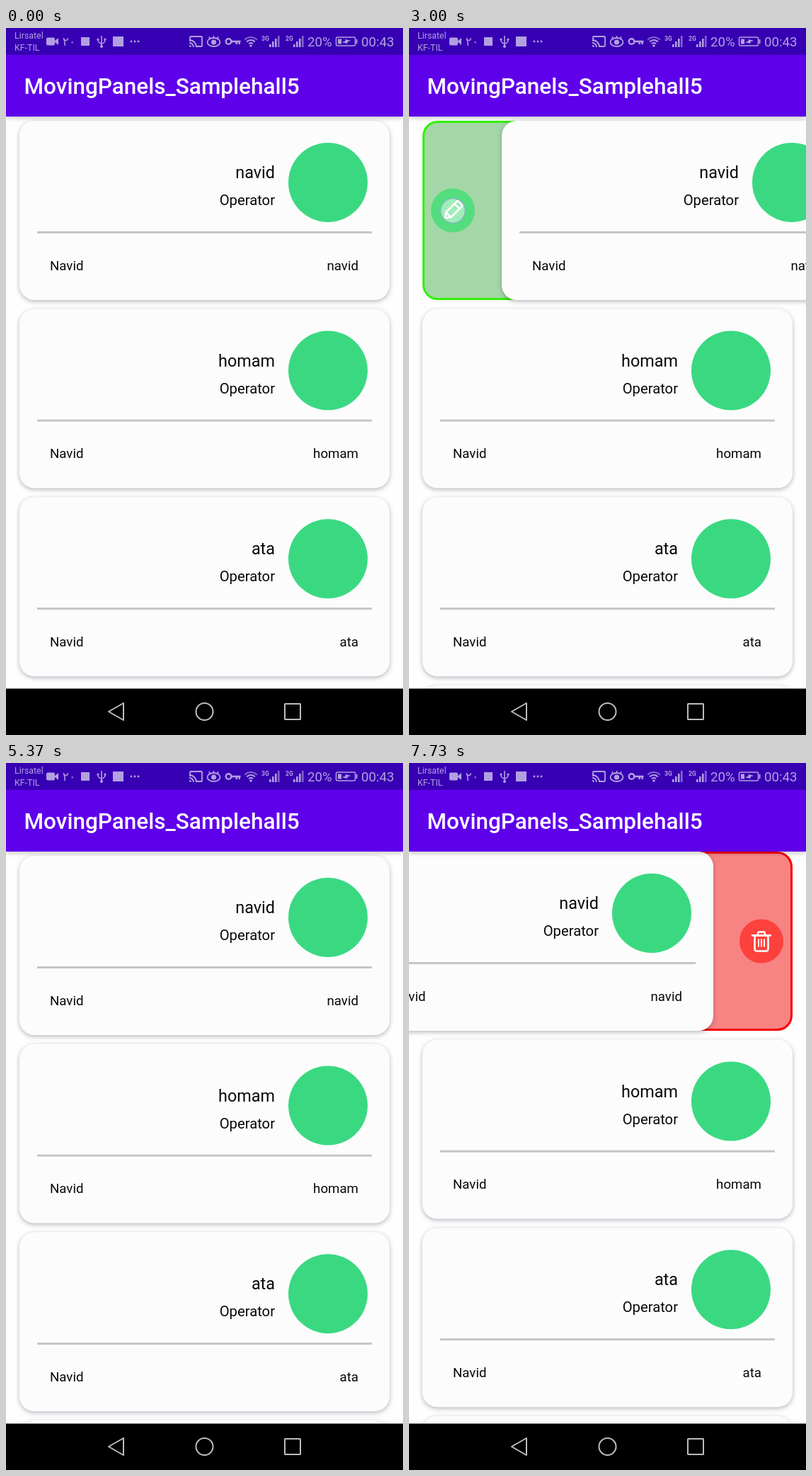
Write an HTML page with a canvas that moves like this. It is 561 by 998 pixels and loops after 8 s.

```html
<!DOCTYPE html>
<html lang="en">
<head>
<meta charset="utf-8">
<title>Swipe cards</title>
<style>
  html, body { margin: 0; width: 100%; height: 100%; overflow: hidden; background: #fefefe; }
  canvas { display: block; width: 561px; height: 998px; }
</style>
</head>
<body>
<canvas id="stage" width="561" height="998"></canvas>
<script>
const ctx = document.getElementById('stage').getContext('2d');
const W = 561, H = 998, LOOP = 8000;
const FONT = 'Roboto, "Noto Sans", sans-serif';
const INK = '#080808', ICON = '#b3a0e2', DIM = '#8263cd', NAV = '#bcbcbc';
const CARD = { x: 19, y: 131, w: 523, h: 253, r: 21, pitch: 265.6 };
const PEOPLE = ['navid', 'homam', 'ata', 'omid'];

// Every finger stroke runs between the same two edges in the same time
const LEFT = 80, RIGHT = 490, STROKE_MS = 350;

// Eased 0 to 1 between two times
function ramp(t, from, to) {
  const k = Math.min(1, Math.max(0, (t - from) / (to - from)));
  return k * k * (3 - 2 * k);
}

// 1 = edit panel open, -1 = delete panel open
const swipeAt = t => ramp(t, 1970, 2470) - ramp(t, 3710, 4130) - ramp(t, 6520, 6870);
const scrollAt = t => -6 * ramp(t, 6520, 6700);
const toastAt = t => ramp(t, 3130, 3300) - ramp(t, 5060, 5340);

function box(x, y, w, h, color) {
  ctx.fillStyle = color;
  ctx.fillRect(x, y, w, h);
}

function fill(color) {
  ctx.fillStyle = color;
  ctx.fill();
}

function stroke(color, width) {
  ctx.strokeStyle = color;
  ctx.lineWidth = width;
  ctx.stroke();
}

function round(x, y, w, h, r) {
  ctx.beginPath();
  ctx.roundRect(x, y, w, h, r);
}

function arc(x, y, r, from = 0, to = 2) {
  ctx.beginPath();
  ctx.arc(x, y, r, from * Math.PI, to * Math.PI);
}

function disc(x, y, r, color) {
  arc(x, y, r);
  fill(color);
}

function ring(x, y, r, color, width) {
  arc(x, y, r);
  stroke(color, width);
}

// Triangle pointing left (dir -1) or right (dir 1)
function triangle(x, y, w, h, dir) {
  ctx.beginPath();
  ctx.moveTo(x + dir * w / 2, y);
  ctx.lineTo(x - dir * w / 2, y - h / 2);
  ctx.lineTo(x - dir * w / 2, y + h / 2);
  ctx.closePath();
}

function text(str, x, y, size, color, align = 'left', weight = 400) {
  ctx.font = `${weight} ${size}px ${FONT}`;
  ctx.textAlign = align;
  ctx.fillStyle = color;
  ctx.fillText(str, x, y);
}

function shadowed(color, blur, paint) {
  ctx.save();
  ctx.shadowColor = color;
  ctx.shadowBlur = blur;
  ctx.shadowOffsetY = 2;
  paint();
  ctx.restore();
}

function panel(y, back, border, x, button, icon) {
  round(CARD.x + 1.5, y + 1.5, CARD.w - 3, CARD.h - 3, CARD.r - 1);
  fill(back);
  stroke(border, 3);
  disc(x, y + 126.5, 31, button);
  ctx.save();
  ctx.translate(x, y + 126.5);
  ctx.lineJoin = 'round';
  icon();
  ctx.restore();
}

function pencil() {
  ctx.rotate(-Math.PI / 4);
  round(-9, -5, 24, 10, 2);
  stroke('#fff', 2.6);
  triangle(-12, 0, 6, 10, -1);
  stroke('#fff', 2.4);
  box(7, -5, 2.4, 10, '#fff');
}

function trash() {
  round(-9.5, -8, 19, 22, 3);
  stroke('#fff', 2.6);
  round(-5, -13, 10, 5, 2);
  stroke('#fff', 2.4);
  box(-14, -9.5, 28, 2.8, '#fff');
  for (let x = -5; x <= 3; x += 4) box(x, -3, 2, 11, '#fff');
}

function card(name, y, swipe) {
  // The trailing edge moves less than the leading one
  const left = swipe * (swipe > 0 ? 112 : 86);
  const right = swipe * (swipe > 0 ? 86 : 112);
  if (swipe > 0) panel(y, '#a5d6a7', '#32f008', 62, '#54dd7f', pencil);
  if (swipe < 0) panel(y, '#f88383', '#f90000', 498, '#fd413c', trash);

  shadowed('rgba(40,40,70,.34)', 6, () => {
    round(CARD.x + left, y, CARD.w + right - left, CARD.h, CARD.r);
    fill('#fcfcfc');
  });

  disc(455 + right, y + 87, 56, '#3ad981');
  text(name, 380 + right, y + 81, 23.4, INK, 'right');
  text('Operator', 380 + right, y + 119, 20.25, INK, 'right');
  box(44 + left, y + 156, 473 + right - left, 3, '#c5c5c9');
  text('Navid', 62 + left, y + 210.5, 18.7, INK);
  text(name, 498 + right, y + 210.5, 18.7, INK, 'right');
}

function signal(x, label) {
  text(label, x, 17.5, 8.5, ICON, 'left', 700);
  for (let i = 0; i < 4; i++) {
    const h = 4 + i * 4;
    box(x + 11 + i * 4, 27 - h, 2.6, h, i < 3 ? ICON : DIM);
  }
}

function camera(x, y) {
  round(x, y - 5.5, 12, 11, 2);
  fill(ICON);
  triangle(x + 14, y, 6, 10, -1);
  fill(ICON);
}

function plug(x, y) {
  box(x - 0.8, y - 8, 1.6, 16, ICON);
  arc(x, y - 2, 5, 0, 1);
  stroke(ICON, 1.5);
  for (const side of [-1, 1]) disc(x + side * 5, y - 3, 1.6, ICON);
  disc(x, y + 7, 2, ICON);
}

function cast(x, y) {
  ctx.save();
  ctx.beginPath();
  ctx.rect(x, y - 8, 20, 8);
  ctx.rect(x + 10, y, 10, 9);
  ctx.clip();
  round(x + 1, y - 7, 17, 14, 1);
  stroke(ICON, 1.8);
  ctx.restore();
  for (let r = 2; r <= 10; r += 4) {
    arc(x, y + 8, r, 1.5, 2);
    stroke(ICON, 1.8);
  }
}

function eye(x, y) {
  ctx.beginPath();
  ctx.ellipse(x, y, 9, 6, 0, 0, Math.PI * 2);
  stroke(ICON, 1.8);
  disc(x, y, 3.6, ICON);
  for (let i = -1; i <= 1; i++) box(x + i * 6 - 0.8, y - 9 + Math.abs(i), 1.6, 4, ICON);
}

function key(x, y) {
  ring(x, y, 3.8, ICON, 2.4);
  box(x + 4, y - 1.3, 13, 2.6, ICON);
  for (const dx of [10, 14]) box(x + dx, y, 2.4, 4, ICON);
}

function wifi(x, y) {
  for (let r = 4; r <= 12; r += 4) {
    arc(x, y, r, 1.24, 1.76);
    stroke(r < 12 ? ICON : DIM, 2);
  }
  disc(x, y, 1.8, ICON);
}

function battery(x, y) {
  round(x, y - 6, 27, 12, 2);
  stroke(ICON, 1.5);
  box(x + 28, y - 3, 2, 6, ICON);
  box(x + 2.5, y - 3.5, 5, 7, ICON);
  triangle(x + 12, y + 1, 8, 4, -1);
  fill(ICON);
  triangle(x + 17, y - 1, 8, 4, 1);
  fill(ICON);
}

function statusBar() {
  box(0, 0, W, 38, '#3700b3');
  text('Lirsatel', 12, 15, 12.4, ICON);
  text('KF-TIL', 12, 32, 12.4, ICON);
  camera(57, 19);
  text('۲۰', 89, 25, 17, ICON, 'center');
  box(106, 13, 12, 12, ICON);
  plug(135, 19);
  box(151, 12, 15, 14, ICON);
  for (let i = 0; i < 3; i++) disc(177 + i * 5, 19, 1.4, ICON);
  cast(259, 19);
  eye(293.5, 20);
  key(314.5, 19);
  wifi(346, 25);
  signal(361, '3G');
  signal(395, '2G');
  text('20%', 426, 26, 18.7, ICON);
  battery(466.5, 19);
  text('00:43', 502, 26, 18.7, ICON);
}

function appBar() {
  shadowed('rgba(0,0,0,.24)', 6, () => box(0, 38, W, 87, '#5f00eb'));
  text('MovingPanels_Samplehall5', 25.5, 93, 31.5, '#fff', 'left', 500);
}

function navBar() {
  box(0, 932.5, W, H - 932.5, '#000');
  ctx.lineJoin = 'round';
  triangle(155.5, 965, 21, 24, -1);
  stroke(NAV, 2);
  ring(280.5, 965, 12, NAV, 2);
  round(394, 954, 22, 22, 0.5);
  stroke(NAV, 2);
}

function toast(alpha) {
  ctx.save();
  ctx.globalAlpha = alpha;
  round(202.5, 783, 156, 49.5, 24.7);
  fill('rgba(214,214,214,.97)');
  text('EDIT', 280.5, 815, 19.8, INK, 'center');
  ctx.restore();
}

function finger(t, start, from, to, y) {
  if (t < start || t > start + STROKE_MS) return;
  const x = from + (to - from) * ramp(t, start, start + STROKE_MS);
  disc(x, y, 17.5, 'rgba(255,255,255,.45)');
  ring(x, y, 17.3, 'rgba(140,150,215,.5)', 1.8);
}

function gestures(t) {
  for (const start of [815, 1450]) finger(t, start, LEFT, RIGHT, 228);
  finger(t, 1965, LEFT, RIGHT, 278);
  finger(t, 2930, 62, 62, 258);
  finger(t, 3660, RIGHT, LEFT, 308);
  for (const start of [5970, 6465, 7330]) finger(t, start, RIGHT, LEFT, 280);
}

function draw(t) {
  box(0, 0, W, H, '#fefefe');
  PEOPLE.forEach((name, i) => {
    const y = CARD.y + scrollAt(t) + i * CARD.pitch;
    if (i < 3 || t > 150) card(name, y, i ? 0 : swipeAt(t));
  });
  appBar();
  statusBar();
  navBar();
  toast(toastAt(t));
  gestures(t);
}

const start = performance.now();
function tick() {
  draw((performance.now() - start) % LOOP);
  requestAnimationFrame(tick);
}
tick();
</script>
</body>
</html>
```
